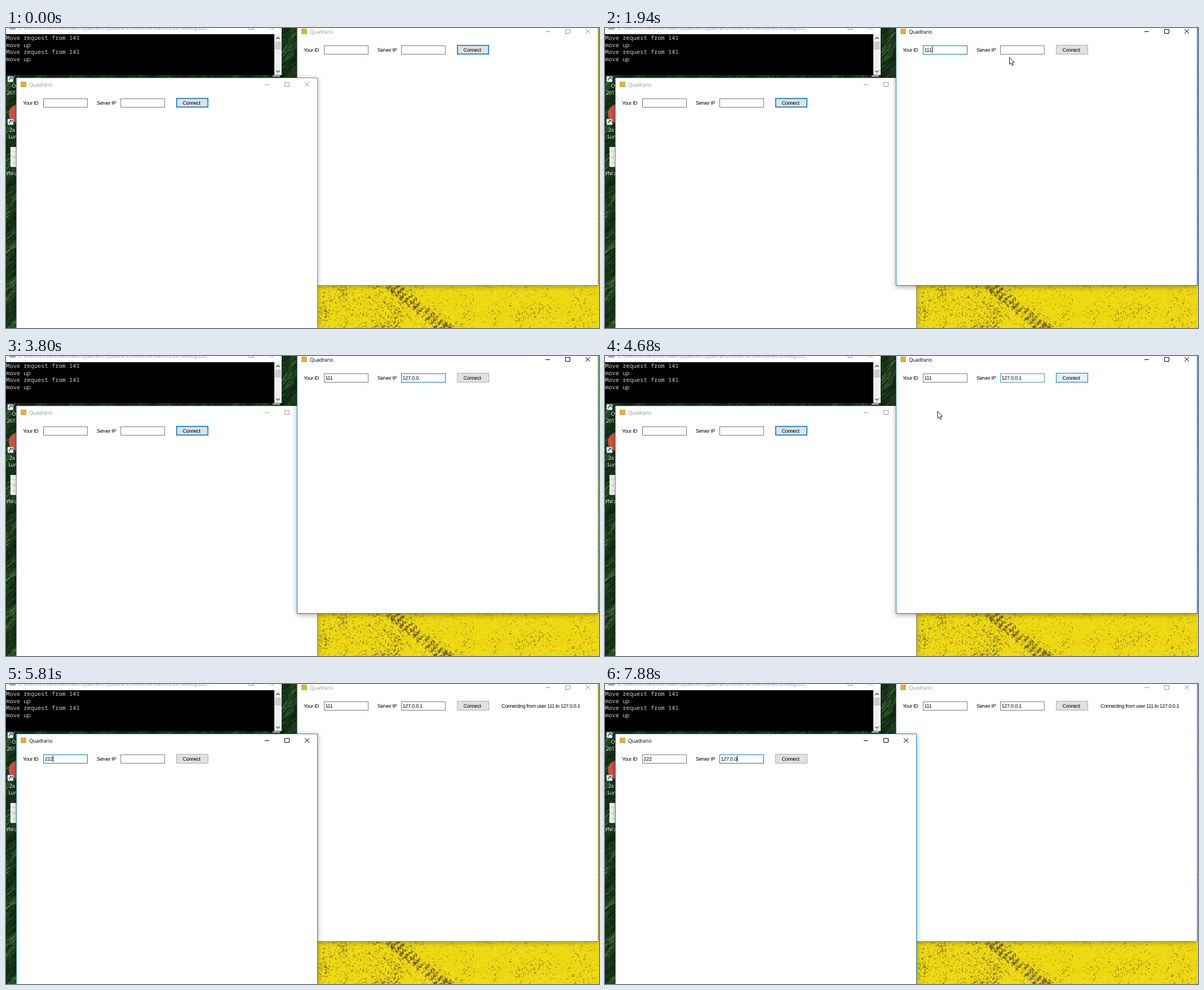
Write an HTML page with a canvas that moves like this. It is 1052 px wide and 532 px high and loops after 8000 ms.

```html
<!DOCTYPE html>
<html lang="en">
<head>
<meta charset="utf-8">
<title>Two client windows</title>
<style>
  html, body { margin: 0; width: 100%; height: 100%; overflow: hidden; background: #fff; }
  canvas, svg { position: absolute; left: 0; top: 0; width: 1052px; height: 532px; }
  text { text-rendering: geometricPrecision; }
  .form { font: 9px "Liberation Sans", Arial, sans-serif; letter-spacing: -.35px; }
  .input { letter-spacing: -.2px; }
  .title { font: 9.2px "Open Sans", "Noto Sans", sans-serif; letter-spacing: -.3px; }
  .desk { fill: #fff; }
  .console { font: 10.38px "Noto Sans Mono", "DejaVu Sans Mono", monospace; fill: #ccc; }
</style>
</head>
<body>
<canvas id="desktop" width="1052" height="532"></canvas>
<svg id="stage" viewBox="0 0 1052 532">
  <defs>
    <filter id="near"><feDropShadow dx="0" dy="1.5" stdDeviation="4" flood-opacity=".32"/></filter>
    <filter id="far"><feDropShadow dx="0" dy="2" stdDeviation="5" flood-opacity=".36"/></filter>
    <g id="shortcut">
      <rect width="10" height="10" fill="#fff"/>
      <path d="M2.5 8V6.5Q3 4 6 3.8M4 2.2H7.8V6" fill="none" stroke="#1f5fa8" stroke-width="1.5"/>
    </g>
  </defs>
  <g class="title desk">
    <use href="#shortcut" x="3" y="85.5"/>
    <text x="10.5" y="106">Ov</text>
    <text x="1.5" y="118">2017</text>
    <circle cx="21" cy="152" r="16" fill="#cf5142"/>
    <use href="#shortcut" x="3" y="161.5"/>
    <text x="6" y="184">Ze</text>
    <text x="4.5" y="195.5">Lum</text>
    <rect x="8" y="211" width="24" height="35.5" fill="#f6f6f6"/>
    <path d="M10 219h7M10 228h8M10 230.5h7M10 239h8" stroke="#ccc"/>
    <text x="0" y="261">YNrz</text>
  </g>
  <g id="terminal">
    <rect width="489" height="83.5" filter="url(#near)"/>
    <rect width="489" height="11" fill="#fff"/>
    <rect x="6" width="11" height="3" fill="#aaa"/>
    <text class="title" x="23" y="3" fill="#999">C:\Users\torvia\Downloads\Quadrario\Quadrario\MovementService\bin\Debug\Co...</text>
    <path d="M431 -5H439V2.5H431ZM467 -5L475 3M475 -5L467 3" fill="none" stroke="#999"/>
    <rect x="476" y="11" width="13" height="72.5" fill="#f0f0f0"/>
    <rect x="477" y="24" width="11" height="14" fill="#cdcdcd"/>
    <path d="M479.5 19.5l3-3 3 3M479.5 75.5l3 3 3-3" fill="none" stroke="#3f5a3f" stroke-width="1.5"/>
    <rect x="473" y="84" width="13" height="2.5" fill="#b9bdb9"/>
    <g class="console">
      <text x="0" y="21">Move request from 141</text>
      <text x="0" y="33.5">move up</text>
      <text x="0" y="46">Move request from 141</text>
      <text x="0" y="58.5">move up</text>
    </g>
  </g>
  <g id="windows"></g>
  <path id="arrow" d="M0 0V12.5L2.9 9.9L4.9 14.6L6.9 13.7L4.9 9.2H8.8Z" fill="#fff" stroke="#000" stroke-width=".9"/>
  <path id="beam" d="M-3 -6H-.8L0 -5.3L.8 -6H3M0 -5.3V5.3M-3 6H-.8L0 5.3L.8 6H3" fill="none" stroke="#000"/>
</svg>
<script>
const LOOP = 8000;
const GREY = '#7a7a7a', HOVER = '#171717', BLUE = '#0078d7';
const BUTTON = {
  initial: ['#e1e1e1', BLUE, 1.6],
  normal: ['#e1e1e1', '#adadad', 1],
  hover: ['#e5f1fb', BLUE, 1],
  pressed: ['#cce4f7', '#005499', 1]
};

// Step tracks: [time, value]. A trailing "|" in a text is the caret.
const FORMS = [
  {
    dx: 0, dy: 0,
    active: [[0, false], [5260, true]],
    id: [[0, ''], [5260, '|'], [5560, '2|'], [5660, '22|'], [5810, '222|'], [6150, '222']],
    idBorder: [[0, GREY], [5100, HOVER], [5260, BLUE], [6150, GREY]],
    ip: [[0, ''], [6150, '|'], [6300, '1|'], [6440, '12|'], [6800, '12'], [7040, '127|'],
      [7320, '127.|'], [7520, '127.0|'], [7680, '127.0.|'], [7880, '127.0.0|']],
    ipBorder: [[0, GREY], [6090, HOVER], [6150, BLUE]],
    button: [[0, 'initial'], [5260, 'normal']],
    status: [[0, '']]
  },
  {
    dx: 498, dy: -94,
    active: [[0, false], [800, true], [5260, false]],
    id: [[0, ''], [800, '|'], [1230, '1|'], [1510, '11|'], [1660, '111|'], [2130, '111']],
    idBorder: [[0, GREY], [640, HOVER], [800, BLUE], [2130, GREY]],
    ip: [[0, ''], [2130, '|'], [2330, '1|'], [2420, '12|'], [2720, '127|'], [2980, '127.|'],
      [3080, '127.0|'], [3230, '127.0.|'], [3340, '127.0.0|'], [3490, '127.0.0.|'],
      [3800, '127.0.0.'], [3900, '127.0.0.1|'], [4380, '127.0.0.1']],
    ipBorder: [[0, GREY], [2050, HOVER], [2130, BLUE], [4430, '#3c90cf'], [4900, GREY]],
    button: [[0, 'initial'], [800, 'normal'], [4130, 'hover'], [4380, 'pressed'], [4430, 'hover'], [4900, 'normal']],
    status: [[0, ''], [4900, 'Connecting from user 111 to 127.0.0.1']]
  }
];

// Pointer path: [time, x, y, shape]; no shape means hidden.
const POINTER = [
  [0, 690, -16], [280, 690, -16, 'arrow'], [500, 640, 15, 'arrow'], [640, 598, 44, 'beam'],
  [1230, 598, 44], [1790, 598, 44, 'beam'], [1830, 640, 46, 'arrow'], [1940, 717.5, 52, 'arrow'],
  [1985, 717.5, 52, 'arrow'], [2060, 726, 40, 'beam'], [2330, 726, 40], [3950, 726, 40, 'beam'],
  [4050, 760, 47, 'arrow'], [4180, 828, 42, 'arrow'], [4640, 828, 42, 'arrow'],
  [4680, 590, 98, 'arrow'], [4725, 590, 98, 'arrow'], [4950, 120, 141, 'arrow'],
  [5100, 101.5, 131.5, 'beam'], [5560, 101.5, 131.5], [5870, 101.5, 131.5, 'beam'],
  [5930, 150, 128, 'arrow'], [6090, 235, 133, 'beam'], [6300, 235, 133]
];

const $ = id => document.getElementById(id);
const indexAt = (track, t) => track.findLastIndex(step => step[0] <= t);
const valueAt = (track, t) => track[indexAt(track, t)][1];

function add(parent, tag, attrs, text = '') {
  const node = document.createElementNS('http://www.w3.org/2000/svg', tag);
  set(node, attrs);
  node.textContent = text;
  return parent.appendChild(node);
}

function set(node, attrs) {
  for (const key in attrs) node.setAttribute(key, attrs[key]);
}

function makeField(parent, x) {
  const box = add(parent, 'rect', { x: x + .5, y: 125.5, width: 78, height: 15, fill: '#fff' });
  const text = add(parent, 'text', { class: 'input', x: x + 2.4, y: 136 });
  const caret = add(parent, 'path', { stroke: '#000' });
  return (value, border) => {
    const plain = value.replace('|', '');
    set(box, { stroke: border });
    if (text.textContent !== plain) text.textContent = plain;
    const end = x + 2.6 + (plain ? text.getComputedTextLength() : 0);
    set(caret, { d: value === plain ? '' : `M${Math.round(end) + .5} 127V138` });
  };
}

function makeForm(form) {
  const root = add($('windows'), 'g', { class: 'form', transform: `translate(${form.dx} ${form.dy})` });
  const frame = add(root, 'rect', { x: 18.5, y: 88.5, width: 534, height: 462, fill: '#fff' });
  add(root, 'rect', { x: 26, y: 95, width: 10, height: 10, fill: '#d9b04a' });
  const title = add(root, 'text', { class: 'title', x: 41, y: 104 }, 'Quadrario');
  const controls = add(root, 'path', {
    d: 'M459 100.5H467M494.5 96.5H502.5V103.5H494.5ZM530 96L538 104M538 96L530 104', fill: 'none'
  });
  add(root, 'text', { x: 30, y: 136 }, 'Your ID');
  add(root, 'text', { x: 161, y: 136 }, 'Server IP');
  const showId = makeField(root, 66), showIp = makeField(root, 203);
  const button = add(root, 'rect', {});
  add(root, 'text', { x: 313.5, y: 136 }, 'Connect');
  const status = add(root, 'text', { x: 381, y: 135.5 });

  return t => {
    const active = valueAt(form.active, t);
    set(frame, { stroke: active ? '#1883d7' : '#8c8c8c', filter: `url(#${active ? 'far' : 'near'})` });
    set(title, { fill: active ? '#000' : '#999' });
    set(controls, { stroke: active ? '#000' : '#999' });
    showId(valueAt(form.id, t), valueAt(form.idBorder, t));
    showIp(valueAt(form.ip, t), valueAt(form.ipBorder, t));
    const [fill, stroke, line] = BUTTON[valueAt(form.button, t)];
    set(button, {
      fill, stroke, 'stroke-width': line,
      x: 302 + line / 2, y: 124 + line / 2, width: 57 - line, height: 17 - line
    });
    status.textContent = valueAt(form.status, t);
    return root;
  };
}

function drawPointer(t) {
  const i = indexAt(POINTER, t);
  const [t0, x0, y0, shape] = POINTER[i];
  const [t1, x1, y1] = POINTER[i + 1] || [LOOP, x0, y0];
  const k = (t - t0) / (t1 - t0);
  for (const name of ['arrow', 'beam']) {
    set($(name), {
      visibility: name === shape ? 'visible' : 'hidden',
      transform: `translate(${x0 + (x1 - x0) * k} ${y0 + (y1 - y0) * k})`
    });
  }
}

function paintDesktop() {
  const ctx = $('desktop').getContext('2d');
  let seed = 7;
  const random = () => (seed = (seed * 16807) % 2147483647) / 2147483647;

  function grass(x, y, w, h, count) {
    ctx.save();
    ctx.beginPath();
    ctx.rect(x, y, w, h);
    ctx.clip();
    ctx.fillStyle = '#133518';
    ctx.fillRect(x, y, w, h);
    for (let i = 0; i < count; i++) {
      const px = x + random() * (w + 20) - 16, py = y + random() * (h + 16);
      const clump = .65 + .35 * Math.sin(px / 9 + py / 12);
      const light = random() ** 1.4 * clump, length = 7 + random() * 14;
      ctx.lineWidth = .7 + random();
      ctx.strokeStyle = `rgb(${10 + light * 78},${34 + light * 100},${14 + light * 58})`;
      ctx.beginPath();
      ctx.moveTo(px, py);
      ctx.lineTo(px + length, py - length * (.6 + random() * .5));
      ctx.stroke();
    }
    ctx.restore();
  }

  // Smoothed random lattice, so that the grains gather in clumps.
  function clumps(w, h, size) {
    const cols = Math.ceil(w / size) + 2;
    const knots = Array.from({ length: cols * (Math.ceil(h / size) + 2) }, random);
    return (x, y) => {
      const u = x / size, v = y / size, c = Math.floor(u), r = Math.floor(v);
      const mix = (a, b, k) => a + (b - a) * k;
      const row = n => mix(knots[n * cols + c], knots[n * cols + c + 1], u - c);
      return mix(row(r), row(r + 1), v - r);
    };
  }

  function sand(x, y, w, h) {
    const image = ctx.createImageData(w, h);
    const fine = clumps(w, h, 2.2), coarse = clumps(w, h, 24);
    for (let i = 0; i < w * h; i++) {
      const px = i % w, py = Math.floor(i / w);
      const across = x + px - 686 - (y + py - 457) * 1.2;
      let density = .12 + .24 * coarse(px, py) + (across < 0 ? .05 : 0);
      if (Math.abs(across) < 16) density += .2 + .15 * Math.sin((px + py) * .45);
      const grain = fine(px, py) * .65 + random() * .35;
      const dark = Math.min(.9, Math.max(0, (density + .1 - grain) * 3.2)) + random() * .07;
      image.data.set([244 - dark * 140, 222 - dark * 132, 18 + dark * 6, 255], i * 4);
    }
    ctx.putImageData(image, x, y);
  }

  grass(0, 80, 24, 452, 2400);
  grass(0, 80, 520, 12, 1400);
  grass(486, 0, 36, 96, 600);
  sand(1048, 0, 4, 457);
  sand(552, 456, 500, 76);
}

paintDesktop();
const [drawLeft, drawRight] = FORMS.map(makeForm);
let front = null;

function draw(t) {
  const left = drawLeft(t), right = drawRight(t);
  const top = valueAt(FORMS[1].active, t) ? right : left;
  if (top !== front) $('windows').append(front = top);
  drawPointer(t);
}

function tick(now) {
  draw(now % LOOP);
  requestAnimationFrame(tick);
}

draw(0);
requestAnimationFrame(tick);
</script>
</body>
</html>
```
